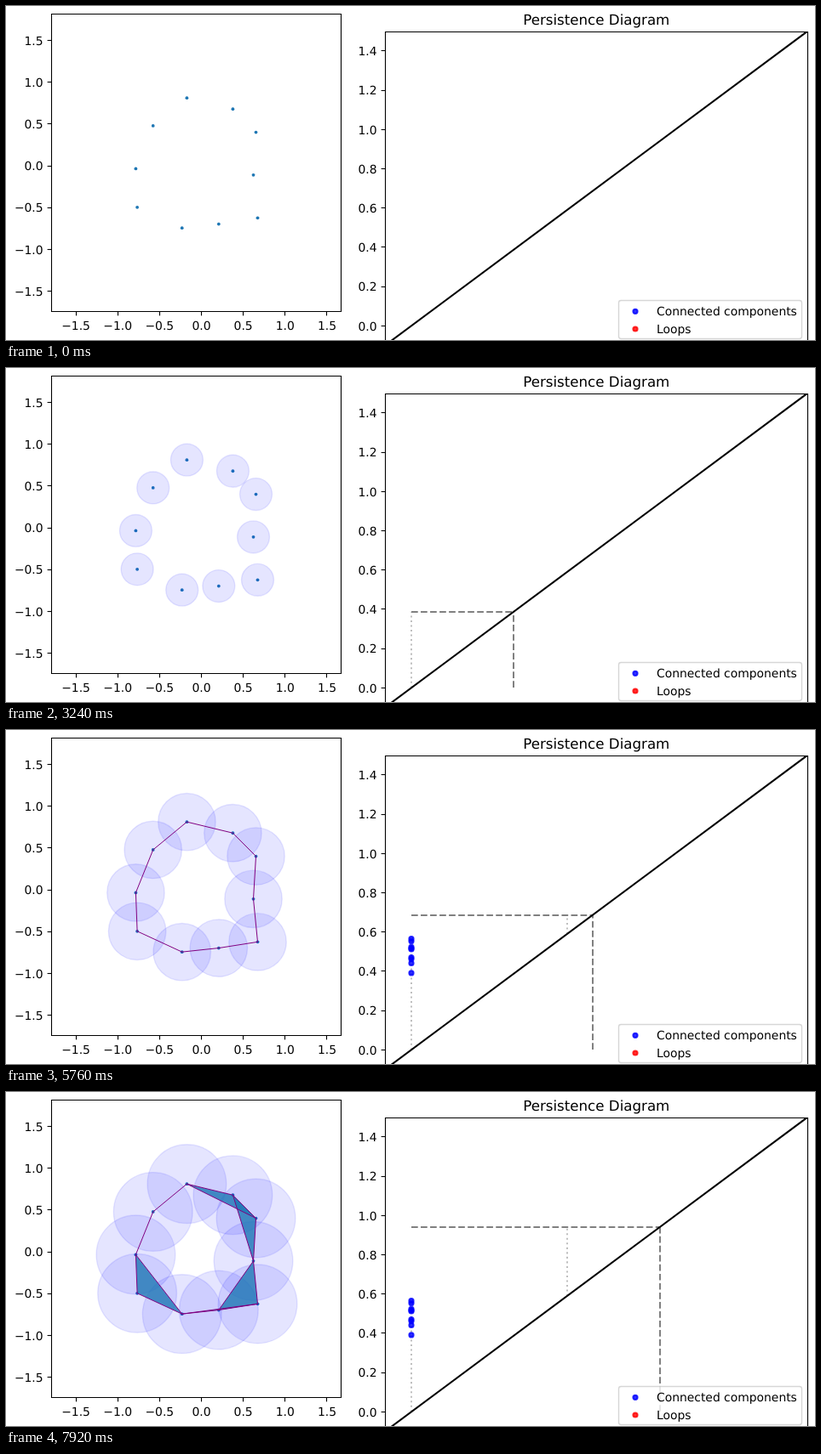
Recreate the animation shown at these times as an HTML page. Size 950 by 393 pixels, loop 8000 ms.

```html
<!DOCTYPE html>
<html lang="en">
<head>
<meta charset="utf-8">
<title>Persistence Diagram</title>
<style>
  html, body { margin: 0; width: 100%; height: 100%; overflow: hidden; background: #fff; }
  svg { display: block; width: 950px; height: 393px; }
  text { font: 13.89px "DejaVu Sans", sans-serif; text-rendering: geometricPrecision; }
  .title { font-size: 16.67px; text-anchor: middle; }
  .axis { fill: none; stroke: #000; stroke-width: 1.1; }
  .point { fill: #1f77b4; }
  .ball { fill: #00f; stroke: #00f; stroke-width: 1.39; opacity: 1; fill-opacity: .1; stroke-opacity: .1; }
  .triangle { fill: #1f77b4; fill-opacity: .8; }
  .edge { stroke: #800080; stroke-width: 1; stroke-linecap: round; }
  .diagonal { stroke: #000; stroke-width: 2.08; }
  .sweep { stroke: #808080; stroke-width: 2; stroke-dasharray: 7.7 3.33; }
  .life { stroke: #808080; stroke-opacity: .5; stroke-width: 2; stroke-dasharray: 2.08 3.44; }
  .marker { stroke-width: 2; fill-opacity: .8; stroke-opacity: .8; }
  .blue { fill: #00f; stroke: #00f; }
  .red { fill: #f00; stroke: #f00; }
  .legend { fill: #fff; fill-opacity: .8; stroke: #ccc; stroke-opacity: .8; stroke-width: 1.39; }
</style>
</head>
<body>
<svg viewBox="0 0 950 393">
  <clipPath id="plot"><rect x="445" y="30" width="497" height="363"/></clipPath>
  <g id="cloud"></g>
  <g id="diagram" clip-path="url(#plot)"></g>
  <g id="axes"></g>
  <rect class="legend" x="719.5" y="346.5" width="215" height="45" rx="2.8"/>
  <circle class="marker blue" cx="739" cy="359.3" r="2.6"/>
  <circle class="marker red" cx="739" cy="380" r="2.6"/>
  <text x="764" y="363.5">Connected components</text>
  <text x="764" y="384.5">Loops</text>
  <text class="title" x="693.3" y="22">Persistence Diagram</text>
</svg>
<script>
const LOOP = 8000, STEP = 120, STEPS_PER_UNIT = 70;
const CLOUD_SCALE = 98.3;
const points = [
  [212.4, 108.15], [266.4, 121.25], [293.5, 148.55], [290.5, 198.85], [295.5, 249.35],
  [249.8, 256.55], [206.7, 261.15], [154.1, 236.8], [152.4, 191.4], [172.7, 140.95]
];
const byId = id => document.getElementById(id);
const line = (cls, x1, y1, x2, y2) =>
  `<line class="${cls}" x1="${x1}" y1="${y1}" x2="${x2}" y2="${y2}"/>`;
const circle = (cls, [x, y], r) => `<circle class="${cls}" cx="${x}" cy="${y}" r="${r}"/>`;
const label = (anchor, x, y, value) =>
  `<text text-anchor="${anchor}" x="${x}" y="${y}">${value.toFixed(1).replace('-', '\u2212')}</text>`;
const crisp = v => Math.floor(v) + .5;
const diagramX = v => 476 + v * 310;
const diagramY = v => 376.3 - v * 231;

const distance = (i, j) =>
  Math.hypot(points[i][0] - points[j][0], points[i][1] - points[j][1]) / CLOUD_SCALE;

// Every edge and triangle of the complex, with the scale at which it appears
const edges = [], triangles = [];
for (let i = 0; i < points.length; i++)
  for (let j = i + 1; j < points.length; j++) {
    edges.push({ ends: [i, j], birth: distance(i, j) });
    for (let k = j + 1; k < points.length; k++)
      triangles.push({
        ends: [i, j, k],
        birth: Math.max(distance(i, j), distance(j, k), distance(i, k))
      });
  }

// Neighbours around the ring: the longest gap closes the loop, the rest merge components
const gaps = points.map((_, i) => distance(i, (i + 1) % points.length)).sort((a, b) => a - b);
const loopBirth = gaps.pop();
const deaths = gaps;
const lastDeath = deaths[deaths.length - 1];

function drawAxes() {
  let out = '<path class="axis" d="M53.5 9.5H393.5V359.5H53.5ZM445.5 393V30.5H941.5V393"/>';
  const yTick = (left, y, value) =>
    line('axis', left - 4.9, crisp(y), left, crisp(y)) + label('end', left - 9.9, y + 5.2, value);
  for (let v = -1.5; v <= 1.5; v += .5) {
    const x = 229.5 + v * CLOUD_SCALE;
    out += line('axis', crisp(x), 359.5, crisp(x), 364.4) + label('middle', x, 381.3, v);
    out += yTick(53.5, 188.1 - v * CLOUD_SCALE, v);
  }
  for (let n = 0; n < 8; n++) out += yTick(445.5, diagramY(n / 5), n / 5);
  byId('axes').innerHTML = out;
}

function drawCloud(t) {
  const shown = list => list.filter(item => item.birth <= t);
  byId('cloud').innerHTML = [
    ...points.map(p => circle('point', p, 1.9)),
    ...(t ? points.map(p => circle('ball', p, t / 2 * CLOUD_SCALE)) : []),
    ...shown(triangles).map(({ ends }) =>
      `<polygon class="triangle" points="${ends.map(i => points[i]).join(' ')}"/>`),
    ...shown(edges).map(({ ends: [i, j] }) => line('edge', ...points[i], ...points[j]))
  ].join('');
}

function drawDiagram(t) {
  const life = (birth, end) => {
    const x = Math.round(diagramX(birth));
    return line('life', x, diagramY(birth), x, diagramY(end));
  };
  const x = Math.round(diagramX(t)), y = Math.round(diagramY(t));
  let out = '';
  if (t) {
    out += life(0, Math.min(t, lastDeath));
    if (t > loopBirth) out += life(loopBirth, t);
    out += line('sweep', 476, y, x, y) + line('sweep', x, 376, x, y);
  }
  out += line('diagonal', diagramX(-.1), diagramY(-.1), diagramX(1.5), diagramY(1.5));
  for (const death of deaths)
    if (death <= t) out += circle('marker blue', [476, diagramY(death)], 2.6);
  byId('diagram').innerHTML = out;
}

const start = performance.now();
let current = -1;
function tick() {
  const step = Math.floor((performance.now() - start) % LOOP / STEP);
  if (step !== current) {
    current = step;
    drawCloud(step / STEPS_PER_UNIT);
    drawDiagram(step / STEPS_PER_UNIT);
  }
  requestAnimationFrame(tick);
}
drawAxes();
tick();
</script>
</body>
</html>
```
